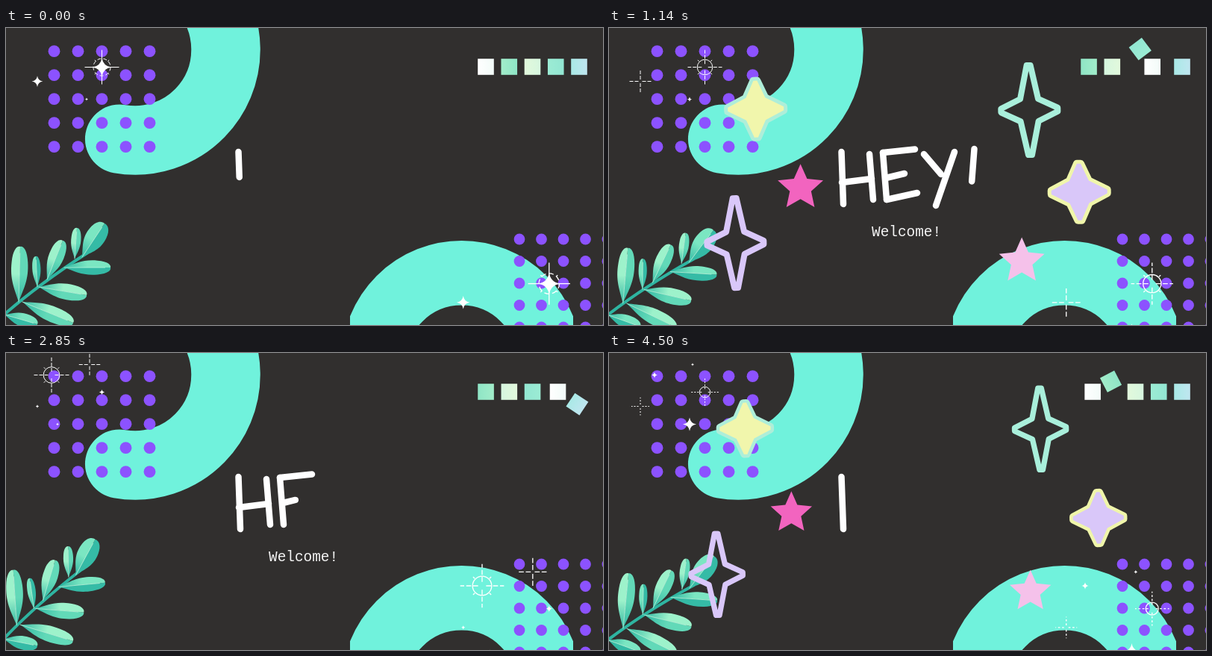
Write an HTML page with a canvas that moves like this. It is 800 px wide and 398 px high and loops after 4.53 s.

```html
<!DOCTYPE html>
<html lang="en">
<head>
<meta charset="utf-8">
<title>Hey</title>
<style>
html, body { margin: 0; width: 100%; height: 100%; overflow: hidden; background: #312f2e; }
canvas { display: block; }
</style>
</head>
<body>
<canvas id="stage" width="800" height="398"></canvas>
<script>
const ctx = document.getElementById('stage').getContext('2d');
const LOOP = 4530, TAU = Math.PI * 2;
const AQUA = '#70f2dc', VIOLET = '#8c52ff';
const clamp = v => Math.max(0, Math.min(1, v));

function at(x, y, angle, scale, draw) {
  ctx.save();
  ctx.translate(x, y);
  ctx.rotate(angle);
  ctx.scale(scale, scale);
  draw();
  ctx.restore();
}

function disc(x, y, r, color) {
  ctx.fillStyle = color;
  ctx.beginPath();
  ctx.arc(x, y, r, 0, TAU);
  ctx.fill();
}

function line(x0, y0, x1, y1) {
  ctx.beginPath();
  ctx.moveTo(x0, y0);
  ctx.lineTo(x1, y1);
  ctx.stroke();
}

// Static shapes
function backdrop() {
  ctx.fillStyle = '#312f2e';
  ctx.fillRect(0, 0, 800, 398);

  ctx.strokeStyle = AQUA;
  ctx.lineCap = 'round';
  ctx.lineWidth = 92.5;
  ctx.beginPath();
  ctx.arc(173, 29, 121.5, -0.8, 1.743);
  ctx.stroke();

  ctx.save();
  ctx.beginPath();
  ctx.rect(461, 280, 299, 118);
  ctx.clip();
  ctx.lineWidth = 86.6;
  ctx.beginPath();
  ctx.arc(610.5, 446, 117.7, Math.PI, TAU);
  ctx.stroke();
  ctx.restore();

  for (let i = 0; i < 5; i++) for (let j = 0; j < 5; j++) {
    disc(64.5 + 32 * i, 31.2 + 32 * j, 7.9, VIOLET);
    disc(688 + 29.5 * i, 283 + 29.5 * j, 7.4, VIOLET);
  }
}

// Swaying branch: base x, y, tip x, y, width, shade
const LEAVES = [
  [92, 309, 95, 268, 13, 0], [42, 347, 40, 306, 11, 1], [55, 337, 76, 285, 20, 0],
  [17, 367, 19, 293, 22, 0], [78, 321, 140, 321, 19, 1], [44, 347, 108, 358, 21, 0],
  [22, 367, 90, 395, 21, 0], [-2, 384, 42, 397, 18, 1], [102, 307, 132, 262, 26, 1]
];
const GREENS = [['#62d9b8', '#9df2cb'], ['#35bba6', '#7be6c2']];

function leaf(x0, y0, x1, y1, width, shade) {
  const len = Math.hypot(x1 - x0, y1 - y0);
  at(x0, y0, Math.atan2(y1 - y0, x1 - x0), 1, () => {
    [1, -1].forEach((side, k) => {
      const h = side * width * 0.58, fill = ctx.createLinearGradient(0, 0, len, 0);
      fill.addColorStop(0, '#35b9a4');
      fill.addColorStop(0.5, GREENS[shade][k]);
      fill.addColorStop(1, GREENS[shade][k]);
      ctx.fillStyle = fill;
      ctx.beginPath();
      ctx.moveTo(0, 0);
      ctx.bezierCurveTo(len * 0.25, h * 0.5, len * 0.4, h, len * 0.72, h * 0.85);
      ctx.bezierCurveTo(len * 0.95, h * 0.75, len * 1.02, h * 0.3, len, 0);
      ctx.fill();
    });
    ctx.strokeStyle = '#b6f6dc';
    ctx.lineWidth = 0.8;
    line(0, 0, len * 0.88, 0);
  });
}

function branch(t) {
  const sway = 4.7 * Math.cos(TAU * (t - 850) / 3700) - 0.6;
  at(-10, 395, sway * Math.PI / 180, 1, () => {
    ctx.translate(10, -395);
    ctx.strokeStyle = '#2eb5a1';
    ctx.lineWidth = 4;
    ctx.beginPath();
    ctx.moveTo(-8, 389);
    ctx.quadraticCurveTo(40, 346, 108, 302);
    ctx.stroke();
    LEAVES.forEach(l => leaf(...l));
  });
}

// White tile slides along the row, the others hop around it
const TILES = [['#a2edca', '#8fe5c6'], ['#e2f9dc', '#d6f6df'], ['#9cecd4', '#92e6d2'], ['#a9e9e6', '#c0e6f0']];

function tile(x, y, angle, [from, to]) {
  at(x, y, angle, 1, () => {
    const fill = ctx.createLinearGradient(-11, 0, 11, 0);
    fill.addColorStop(0, from);
    fill.addColorStop(1, to);
    ctx.fillStyle = fill;
    ctx.fillRect(-10.8, -10.8, 21.6, 21.6);
  });
}

function tiles(t) {
  const u = t % 4261, back = u > 2241, dir = back ? -1 : 1;
  const p = back ? 1 - clamp((u - 2241) / 1926) : clamp(u / 1845);
  const slot = 2 - 2 * Math.cos(Math.PI * p);
  TILES.forEach((colors, k) => {
    const before = k === 0 ? 0 : 0.12, after = k === 3 ? 0 : 0.08;
    const a = Math.PI * clamp((slot - k + before) / (1 + before + after));
    tile(674.25 + 31.25 * k - 15.6 * (1 - Math.cos(a)), 52 - dir * 30 * Math.sin(a), -dir * a, colors);
  });
  tile(643 + 31.25 * slot, 52, 0, ['#ffffff', '#f2fbf8']);
}

// Hand-drawn word, one stroke after another
const STROKES = [
  [311.5, 166, 314, 236], [349, 169, 354, 230], [312, 207, 352, 202],
  [367, 167, 372, 230], [367, 167, 410, 162.5], [371, 201, 396, 195], [372, 230, 413, 221],
  [422, 169, 445, 196], [463, 166, 438, 238], [489.5, 162, 485, 221], [483, 238, 483.1, 238]
];

function word(t) {
  const u = (t + 45) % 2212;
  ctx.strokeStyle = '#fff';
  STROKES.forEach(([x0, y0, x1, y1], k) => {
    const p = clamp((u - 124 * k) / 95);
    if (p < 0.15) return;
    ctx.lineWidth = k === 10 ? 11 : 8.5;
    line(x0, y0, x0 + (x1 - x0) * p, y0 + (y1 - y0) * p);
  });
}

function welcome(t) {
  const shown = Math.min(Math.floor(t / 125), Math.ceil((4500 - t) / 75), 8);
  ctx.fillStyle = '#f4f4f4';
  ctx.font = '19.4px "Liberation Mono", monospace';
  ctx.fillText('Welcome!'.slice(0, Math.max(0, shown)), 352, 279);
}

// Burst of stars: end x, y, travel x, y, shape, fill, stroke
const STARS = [
  [182, 101, -79, -41, 'gem', '#f1f6ac', '#aeeed9'],
  [244, 214.5, -68, 2, 'five', '#f264bf'],
  [144, 297, -137, 48, 'kite', null, '#d9c7f9'],
  [578.5, 101.5, 82, -46, 'kite', null, '#a9efdb'],
  [656.5, 221, 142, 7, 'gem', '#d9c7f9', '#f0f6aa'],
  [565, 320, 64, 40, 'five', '#f5c1ea']
];

function fiveStar() {
  ctx.beginPath();
  for (let i = 0; i < 10; i++) {
    const a = i / 10 * TAU - Math.PI / 2, r = i % 2 ? 15 : 32;
    ctx.lineTo(r * Math.cos(a), r * Math.sin(a));
  }
  ctx.closePath();
}

// Four blunt arms
function fourStar(rx, ry, inX, inY) {
  const blunt = 2.5;
  ctx.beginPath();
  for (const s of [1, -1]) {
    ctx.lineTo(-blunt * s, -ry * s);
    ctx.lineTo(blunt * s, -ry * s);
    ctx.lineTo(inX * s, -inY * s);
    ctx.lineTo(rx * s, -blunt * s);
    ctx.lineTo(rx * s, blunt * s);
    ctx.lineTo(inX * s, inY * s);
  }
  ctx.closePath();
}

const SHAPES = {
  five: fiveStar,
  gem: () => fourStar(37.5, 38, 13, 15),
  kite: () => fourStar(38, 60, 12, 15)
};

function stars(t) {
  const u = t % 2842;
  const scale = Math.min(clamp((u - 300) / 220), 1 - clamp((u - 1560) / 330) ** 2);
  if (scale <= 0) return;
  const left = 0.56 * Math.max(0, (1883 - u) / 1073) ** 3;
  ctx.lineJoin = 'round';
  STARS.forEach(([x, y, dx, dy, shape, fill, stroke]) => {
    at(x - dx * left, y - dy * left, shape === 'five' ? 0 : -0.02, scale, () => {
      SHAPES[shape]();
      if (stroke) {
        ctx.strokeStyle = stroke;
        ctx.lineWidth = fill ? 10 : 8;
        ctx.stroke();
      }
      if (fill) {
        ctx.fillStyle = fill;
        ctx.fill();
      }
    });
  });
}

// Twinkles: x, y, radius, phase, leaves a trail
const TWINKLES = [
  [0, 0, 18, 0, true], [51, -14, 9, 0, true], [67.5, 23, 17, 630, true],
  [-19, 42, 10, 630, true], [8, 66, 9, 720, false], [47, 66, 9, 300, true]
];

function twinkle(x, y, r, p, trail) {
  const grow = Math.max(0.22 * clamp((p - 80) / 80), clamp((p - 300) / 180));
  const size = r * Math.min(grow, clamp((690 - p) / 80));
  const big = r > 12, late = p > 760;
  at(x, y, 0, 1, () => {
    ctx.fillStyle = ctx.strokeStyle = '#fff';
    ctx.lineWidth = 1;
    ctx.lineCap = 'butt';
    if (size > 0) {
      const c = size * 0.13;
      ctx.beginPath();
      ctx.moveTo(0, -size);
      ctx.quadraticCurveTo(c, -c, size, 0);
      ctx.quadraticCurveTo(c, c, 0, size);
      ctx.quadraticCurveTo(-c, c, -size, 0);
      ctx.quadraticCurveTo(-c, -c, 0, -size);
      ctx.fill();
    }
    if (!trail) return;
    const rays = big && p > 400 && p < 660, cross = p > 640 && p < 860;
    const reach = r + 6 * clamp((860 - p) / 150);
    for (let k = 0; k < 8; k++) {
      const c = Math.cos(k * TAU / 8), s = Math.sin(k * TAU / 8);
      if (k % 2) {
        if (big && (rays || cross && !late)) line(c * r * 0.65, s * r * 0.65, c * r * 0.8, s * r * 0.8);
      } else if (cross || rays) {
        ctx.setLineDash(cross ? (late ? [2, 2] : [5, 2]) : []);
        line(c * r * 0.25, s * r * 0.25, c * reach, s * reach);
      }
      ctx.setLineDash([]);
    }
    if (big && p > 590 && p < 860) {
      ctx.setLineDash(p < 680 ? [5, 3] : []);
      ctx.beginPath();
      ctx.arc(0, 0, r * (p < 680 ? 0.68 : late ? 0.42 : 0.6), 0, TAU);
      ctx.stroke();
    }
  });
}

function twinkles(t) {
  for (const [x, y, scale] of [[61, 29.5, 1], [638, 312, 1.33]]) {
    at(x, y, 0, scale, () => TWINKLES.forEach(([dx, dy, r, phase, trail]) =>
      twinkle(dx, dy, r / (scale > 1 ? 1.12 : 1), (t + phase) % 1080, trail)));
  }
}

function frame(now) {
  const t = now % LOOP;
  backdrop();
  branch(t);
  tiles(t);
  ctx.lineCap = 'round';
  word(t);
  welcome(t);
  stars(t);
  twinkles(t);
  requestAnimationFrame(frame);
}
requestAnimationFrame(frame);
</script>
</body>
</html>
```
